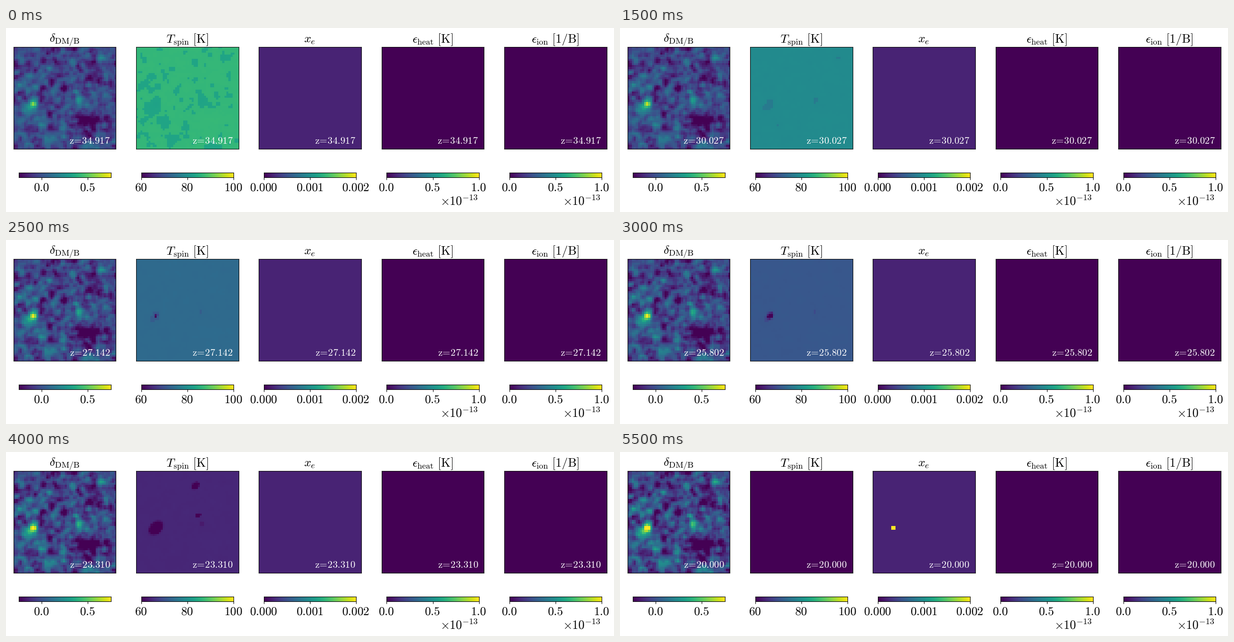
These frames come from a looping animation (1280x388 px, 7 s). A matplotlib script:

```python
import numpy as np
import matplotlib.pyplot as plt
from matplotlib.animation import FuncAnimation

W, H, DPI = 1280, 388, 100
N = 50                        # cells per side
LEFT, TOP, SIDE, PITCH = 15.8, 39.6, 215.6, 258.3
STEPS, LAST = 14, 11          # the final state is held

plt.rcParams.update({
    "mathtext.fontset": "cm",
    "axes.linewidth": 0.8,
    "image.cmap": "viridis",
})

# main clumps: x, y, height, radius in cells
CLUMPS = [
    (9.7, 28, .75, 1.3), (28.8, 7.4, .50, 1.2), (30.3, 22, .40, 1.0),
    (6, 30, .25, 2.5), (43.5, 10, .22, 2.0), (32, 27, .25, 1.3),
    (22, 45, .20, 3.5), (36, 37, -.25, 4.0),
]

X, Y = np.meshgrid(np.arange(N) + .5, np.arange(N) + .5)


def smooth_noise(seed, sigma):
    white = np.random.default_rng(seed).normal(size=(N, N))
    f = np.fft.fftfreq(N)
    k2 = f[:, None] ** 2 + f[None, :] ** 2
    out = np.fft.ifft2(np.fft.fft2(white) * np.exp(-2 * (np.pi * sigma) ** 2 * k2)).real
    return out / out.std()


def density_field():
    field = .09 * smooth_noise(4, .8) + .07 * smooth_noise(7, 1.6) - .03
    for x, y, height, radius in CLUMPS:
        field += height * np.exp(-((X - x) ** 2 + (Y - y) ** 2) / (2 * radius ** 2))
    return field


FIELD = density_field()


def redshift(k):
    return 21 * 1.05 ** (LAST - k) - 1


def density(k):
    growth = 21 / (1 + redshift(k))
    return FIELD * growth ** np.where(FIELD > 0, 1, .4)


def spin_temp(k):
    cut = .42 - .01 * (k - 6) ** 2
    temp = 86.5 - 2.4 * k - .0057 * k ** 3 - .6 * FIELD
    temp -= (3 - .22 * k) * (FIELD > cut)
    # the taller a clump, the sooner a cold spot spreads from it
    for x, y, height, _ in CLUMPS:
        reach = .7 * (k - 9.4 + 7.2 * height)
        if reach > 0:
            u = (X - x - Y + y) / 1.7
            v = (X - x + Y - y) / 1.2
            temp -= 16 * np.exp(-(np.hypot(u, v) / reach) ** 4)
    return temp


def electrons(k):
    x, y = CLUMPS[0][:2]
    bubble = np.maximum(abs(X - x), abs(Y - y)) < 1
    return np.where(bubble & (k >= LAST - 1), 2e-3, 2e-4)


def nothing(k):
    return np.zeros((N, N))


def rm(text):
    return r"$\mathrm{%s}$" % text


EXP = r"$\times10^{-13}$"
# title, data, range, ticks, tick format, exponent
PANELS = [
    (r"$\delta_{\mathrm{DM/B}}$", density, (-.25, .75), (0, .5), "%.1f", ""),
    (r"$T_{\mathrm{spin}}\ \mathrm{[K]}$", spin_temp, (60, 100), (60, 80, 100), "%d", ""),
    (r"$x_e$", electrons, (0, .002), (0, .001, .002), "%.3f", ""),
    (r"$\epsilon_{\mathrm{heat}}\ \mathrm{[K]}$", nothing, (0, 1), (0, .5, 1), "%.1f", EXP),
    (r"$\epsilon_{\mathrm{ion}}\ \mathrm{[1/B]}$", nothing, (0, 1), (0, .5, 1), "%.1f", EXP),
]

fig = plt.figure(figsize=(W / DPI, H / DPI), dpi=DPI, facecolor="white")


def add_axes(x, y, w, h):
    ax = fig.add_axes([x / W, 1 - (y + h) / H, w / W, h / H])
    ax.set(xticks=[], yticks=[])
    return ax


def label(x, y, text, size=18.2, ha="center", color="black"):
    return fig.text(x / W, 1 - y / H, text, fontsize=size, ha=ha, va="baseline", color=color)


def color_bar(x, lim, ticks, fmt):
    w = .9 * SIDE
    ax = add_axes(x, 305, w, 9.8)
    ax.imshow(np.linspace(0, 1, 256)[None, :], aspect="auto", extent=(*lim, 0, 1))
    ax.set_xticks(ticks, [""] * len(ticks))
    ax.tick_params(axis="x", length=3.5, width=.8)
    for t in ticks:
        label(x - .6 + w * (t - lim[0]) / (lim[1] - lim[0]), 343.4, rm(fmt % t))


images, stamps = [], []
for i, (title, data, lim, ticks, fmt, exponent) in enumerate(PANELS):
    x = LEFT + i * PITCH
    ax = add_axes(x, TOP, SIDE, SIDE)
    images.append(ax.imshow(data(0), vmin=lim[0], vmax=lim[1],
                            interpolation="nearest", aspect="auto"))
    label(x + SIDE / 2 - .6, 31, title, 18.5)
    stamps.append(label(x + .945 * SIDE, 244.3, "", 15, "right", "white"))
    color_bar(x + .05 * SIDE, lim, ticks, fmt)
    if exponent:
        label(x + .943 * SIDE, 374, exponent, 18.5, "right")


def update(n):
    k = min(n, LAST)
    text = rm(r"z\!=\!%.3f" % redshift(k))
    for image, stamp, panel in zip(images, stamps, PANELS):
        image.set_data(panel[1](k))
        stamp.set_text(text)
    return images + stamps


anim = FuncAnimation(fig, update, frames=STEPS, interval=500, repeat=True, repeat_delay=0)
plt.show()
```
